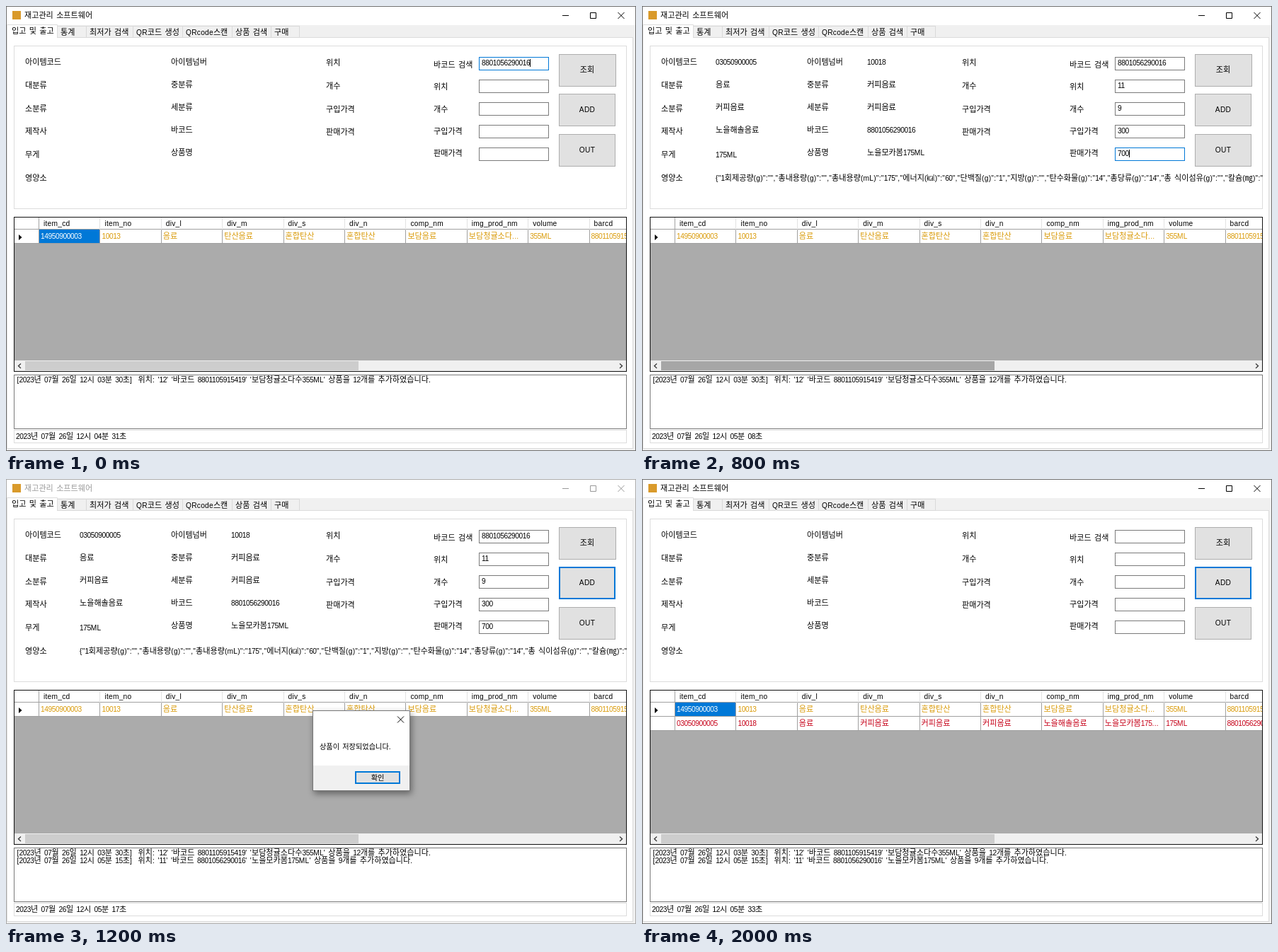
An HTML page for the animation above (2.4 s loop, 890 px wide and 629 px high).

```html
<!DOCTYPE html>
<html lang="ko">
<head>
<meta charset="utf-8">
<title>재고관리 소프트웨어</title>
<style>
  html, body { margin: 0; width: 100%; height: 100%; overflow: hidden; background: #fff; }
  svg { display: block; width: 890px; height: 629px; }
  text { font: 11.1px "Noto Sans CJK KR", "Noto Sans CJK JP", "Noto Sans CJK", sans-serif; word-spacing: 1.2px; white-space: pre; }
  .latin, .digit { font-family: "Liberation Sans", sans-serif; font-size: 10.2px; letter-spacing: .25px; }
  .digit { letter-spacing: -.42px; }
  .dialog text { font-size: 10.2px; }
</style>
</head>
<body>
<svg id="stage" viewBox="0 0 890 629">
  <defs>
    <clipPath id="panelClip"><rect x="12" y="57" width="865" height="229"/></clipPath>
    <clipPath id="gridClip"><rect x="12" y="299" width="864" height="217"/></clipPath>
    <filter id="shadow" x="-20%" y="-20%" width="140%" height="150%">
      <feDropShadow dx="2" dy="4" stdDeviation="5" flood-opacity=".42"/>
    </filter>
  </defs>
  <g id="view"></g>
</svg>
<script>
const STEP = 400;
const BLUE = '#0078d7', GRAY = '#7a7a7a', PALE = '#dcdcdc', LINE = '#a0a0a0';

// Hangul, digits and Latin letters have separate metrics.
const runs = s => s.replace(/\d+|[!-\/:-~]+/g, run =>
  `<tspan class="${/\d/.test(run) ? 'digit' : 'latin'}">${run}</tspan>`);
// y is the visual middle of the line
const text = (x, y, s, fill = '#000', anchor = 'start') =>
  `<text x="${x}" y="${y + 4}" fill="${fill}" text-anchor="${anchor}">${runs(s)}</text>`;
const fill = (x, y, w, h, color) =>
  `<rect x="${x}" y="${y}" width="${w}" height="${h}" fill="${color}"/>`;
const box = (x, y, w, h, stroke, color = '#fff', t = 1) =>
  `<rect x="${x + t / 2}" y="${y + t / 2}" width="${w - t}" height="${h - t}" fill="${color}" stroke="${stroke}" stroke-width="${t}"/>`;
const path = (d, stroke, width = 1) =>
  `<path d="${d}" fill="none" stroke="${stroke}" stroke-width="${width}"/>`;
const cross = (x, y, color) =>
  path(`M${x - 4.5} ${y - 4.5}l9 9m0 -9l-9 9`, color);
const column = (x, ys, items) => items.map((s, i) => text(x, ys[i], s)).join('');

const ROWS = [79, 111, 143, 175, 207];
const LEFT_ROWS = [79, 112, 145, 177, 210, 243];
const TABS = [['통계', 72, 113], ['최저가 검색', 113, 179], ['QR코드 생성', 179, 249],
  ['QRcode스캔', 249, 319], ['상품 검색', 319, 374], ['구매', 374, 414]];
const BUTTONS = [['조회', 68, 81], ['ADD', 124, 80], ['OUT', 181, 80]];
const HEADERS = ['item_cd', 'item_no', 'div_l', 'div_m', 'div_s', 'div_n',
  'comp_nm', 'img_prod_nm', 'volume', 'barcd'];
const SODA = ['14950900003', '10013', '음료', '탄산음료', '혼합탄산', '혼합탄산',
  '보담음료', '보담청귤소다...', '355ML', '8801105915419'];
const COFFEE = ['03050900005', '10018', '음료', '커피음료', '커피음료', '커피음료',
  '노을해솔음료', '노을모카봄175...', '175ML', '8801056290016'];
const NUTRIENTS = '{"1회제공량(g)":"","총내용량(g)":"","총내용량(mL)":"175","에너지(㎉)":"60",' +
  '"단백질(g)":"1","지방(g)":"","탄수화물(g)":"14","총당류(g)":"14","총 식이섬유(g)":"","칼슘(㎎)":""';
const LOG = [
  "[2023년 07월 26일 12시 03분 30초]  위치: '12' '바코드 8801105915419' '보담청귤소다수355ML' 상품을 12개를 추가하였습니다.",
  "[2023년 07월 26일 12시 05분 15초]  위치: '11' '바코드 8801056290016' '노을모카봄175ML' 상품을 9개를 추가하였습니다."];

const CODE = '8801056290016';
const ENTRY = [CODE, '11', '9', '300', '700'];
const STATES = [
  { clock: '04분 31초', inputs: [CODE], field: 0, caret: 741, selected: true },
  { clock: '04분 46초', inputs: [CODE], button: 0, details: true },
  { clock: '05분 08초', inputs: ENTRY, field: 4, caret: 689, details: true, thumbHover: true },
  { clock: '05분 17초', inputs: ENTRY, button: 1, details: true, saved: true,
    dialog: { x: 433, w: 138, message: '상품이 저장되었습니다.' } },
  { clock: '05분 26초', inputs: [], button: 1, saved: true,
    dialog: { x: 428, w: 148, message: '데이터가 저장되었습니다.' } },
  { clock: '05분 33초', inputs: [], button: 1, saved: true, selected: true, listed: true },
];

function windowFrame(inactive) {
  const ink = inactive ? '#999' : '#000';
  return fill(0, 0, 890, 629, '#fff') + fill(1, 27, 888, 601, '#f0f0f0') +
    box(1, 44, 885, 582, PALE) +
    TABS.map(([name, x, end]) =>
      box(x, 28, end - x + 1, 17, '#d9d9d9', '#f0f0f0') + text(x + 5, 36.5, name)).join('') +
    fill(2, 27, 70, 19, '#fff') + path('M1.5 45V26.5H72.5V44', PALE) + text(8, 35, '입고 및 출고') +
    fill(9, 7, 12, 12, '#d99a2b') + text(26, 13, '재고관리 소프트웨어', ink) +
    path('M786 13.5h9M825.5 9.5h8v8h-8z', ink) + cross(869, 13.5, ink) +
    box(0, 0, 890, 629, inactive ? '#aaa' : '#6e6e6e', 'none');
}

function formPanel(s) {
  const labels =
    column(27, LEFT_ROWS, ['아이템코드', '대분류', '소분류', '제작사', '무게', '영양소']) +
    column(233, ROWS, ['아이템넘버', '중분류', '세분류', '바코드', '상품명']) +
    column(452, [80, 113, 146, 178], ['위치', '개수', '구입가격', '판매가격']) +
    column(604, [83, 114, 145.5, 177, 208], ['바코드 검색', '위치', '개수', '구입가격', '판매가격']);
  const details = s.details
    ? column(104, [...ROWS.slice(0, 4), 210, 242.5], [COFFEE[0], '음료', '커피음료', COFFEE[6], '175ML', NUTRIENTS]) +
      column(318, ROWS, [COFFEE[1], '커피음료', '커피음료', CODE, '노을모카봄175ML'])
    : '';
  const fields = ROWS.map((_, i) => {
    const y = 72 + 32 * i, focused = s.field === i;
    return box(668, y, 99, 19, focused ? BLUE : GRAY) + text(672, y + 8, s.inputs[i] || '') +
      (focused ? fill(s.caret - 1, y + 3, 1, 11, '#000') : '');
  }).join('');
  const buttons = BUTTONS.map(([name, y, w], i) =>
    (s.button === i ? box(781, y, w, 46, BLUE, '#e1e1e1', 2) : box(781, y, w, 46, '#adadad', '#e1e1e1')) +
    text(821, y + 22, name, '#000', 'middle')).join('');
  return box(11, 56, 866, 231, PALE) +
    `<g clip-path="url(#panelClip)">${labels}${details}${fields}${buttons}</g>`;
}

const columnX = i => 47 + 86.4 * i;
const divider = (i, y, h, color) => path(`M${Math.round(columnX(i)) - .5} ${y}v${h}`, color);

function gridRow(y, cells, color, selected) {
  return fill(12, y, 865, 19, '#fff') + path(`M12 ${y + 19.5}H877`, LINE) +
    cells.map((cell, i) => {
      const x = columnX(i), chosen = selected && i === 0;
      return (chosen ? fill(x, y, 86, 19, BLUE) : '') + divider(i, y, 20, LINE) +
        text(x + 2, y + 9, cell, chosen ? '#fff' : color);
    }).join('');
}

function grid(s) {
  const header = fill(12, 299, 865, 17, '#fff') + path('M12 315.5H877', LINE) +
    HEADERS.map((name, i) =>
      divider(i, 299, 17, i ? '#e2e2e2' : LINE) + text(columnX(i) + 6, 307, name)).join('');
  const rows = gridRow(316, SODA, '#d99a08', s.selected) +
    (s.listed ? gridRow(336, COFFEE, '#c60018') : '') +
    '<path d="M18 323l4.5 4l-4.5 4z"/>';
  const scrollbar = fill(12, 501, 865, 15, '#f0f0f0') +
    fill(27, 502, 471, 13, s.thumbHover ? '#a6a6a6' : '#cdcdcd') +
    path('M21 505.5l-3.5 3.2l3.5 3.2M867 505.5l3.5 3.2l-3.5 3.2', '#404040', 1.4);
  return `<g clip-path="url(#gridClip)">${fill(12, 299, 865, 218, '#ababab')}${header}${rows}${scrollbar}</g>` +
    box(11, 298, 866, 219, '#111', 'none');
}

function footer(s) {
  return box(11, 599, 866, 19, PALE) + box(11, 521, 866, 77, GRAY) +
    column(15.5, [528, 538.5], LOG.slice(0, s.saved ? 2 : 1)) +
    text(14, 608, `2023년 07월 26일 12시 ${s.clock}`);
}

function dialog({ x, w, message }) {
  const right = x + w;
  return `<g class="dialog"><g filter="url(#shadow)">${box(x, 327, w, 114, '#777')}</g>` +
    fill(x + 1, 405, w - 2, 35, '#f0f0f0') + cross(right - 13.5, 340, '#000') +
    text(x + 10, 378, message) + box(right - 78, 413, 64, 18, BLUE, '#e1e1e1', 2) +
    text(right - 46, 421.5, '확인', '#000', 'middle') + '</g>';
}

const view = document.getElementById('view');
let shown = -1;
function tick(now) {
  const index = Math.floor(now / STEP) % STATES.length;
  if (index !== shown) {
    const s = STATES[shown = index];
    view.innerHTML = windowFrame(s.dialog) + formPanel(s) + grid(s) + footer(s) +
      (s.dialog ? dialog(s.dialog) : '');
  }
  requestAnimationFrame(tick);
}
tick(performance.now());
</script>
</body>
</html>
```
